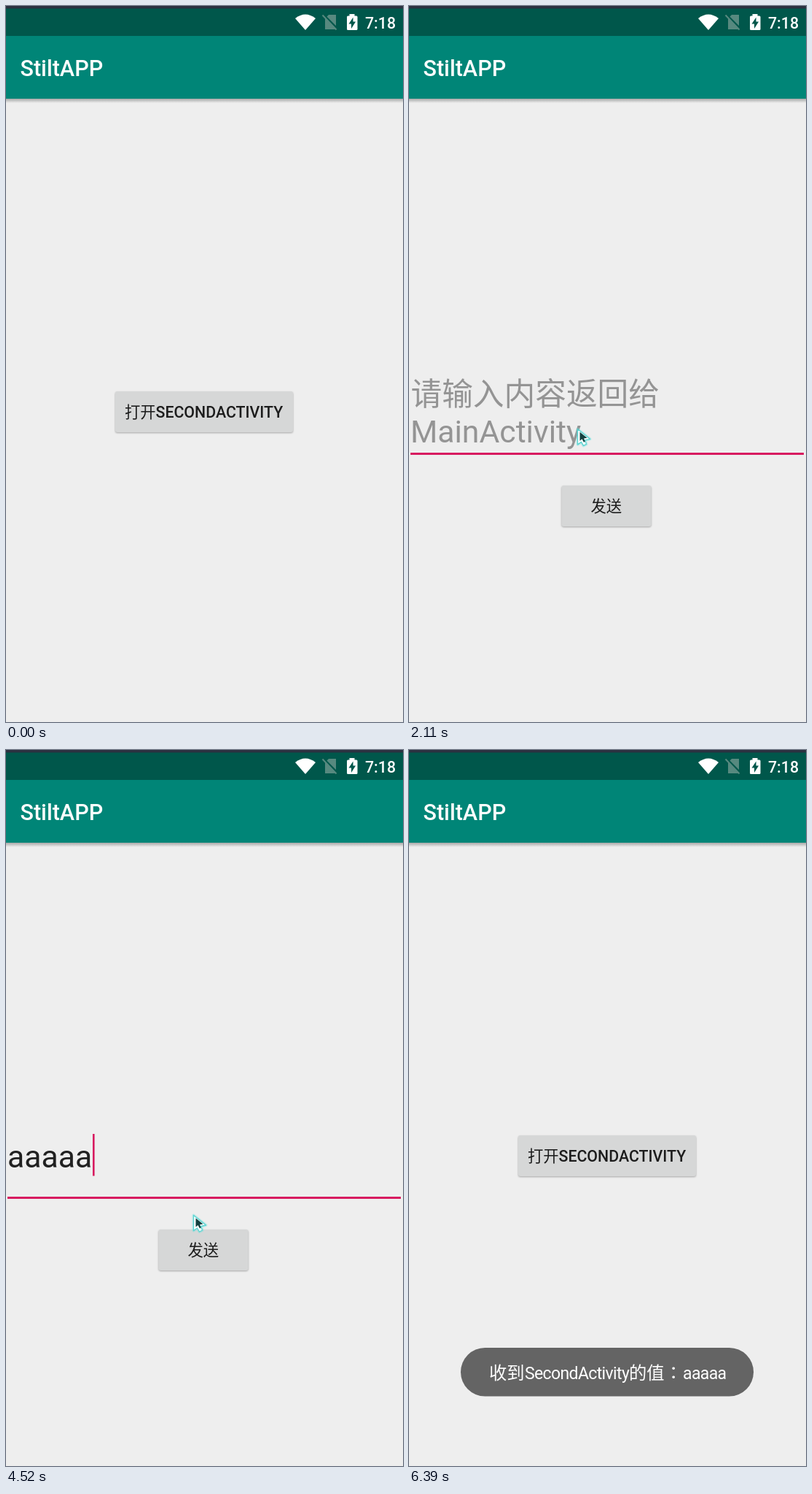
Animation, 545 px wide and 981 px high, one loop 6.77 s. Source, as an HTML page:

```html
<!DOCTYPE html>
<html lang="zh-CN">
<head>
<meta charset="utf-8">
<title>Activity result demo</title>
<style>
html, body { margin: 0; width: 100%; height: 100%; overflow: hidden; background: #eee; }
svg { display: block; width: 545px; height: 981px; }
text { font-family: Roboto, "Noto Sans CJK SC", "Noto Sans CJK", sans-serif; white-space: pre; }
.cap { font-size: 21.33px; fill: #1c1c1c; }
.med { font-weight: 500; }
.title { font-size: 30.5px; font-weight: 500; fill: #fff; }
.big { font-size: 42.7px; fill: #212121; }
.hint { fill: #949494; }
.toast { font-size: 24.3px; fill: #fff; }
.latin { font-size: 23px; letter-spacing: -.63px; }
.colon { font-family: "Noto Sans CJK TC", "Noto Sans CJK", sans-serif; }
.arrow { fill: #fff; stroke-linejoin: round; }
</style>
</head>
<body>
<svg viewBox="0 0 545 981">
  <defs>
    <linearGradient id="fall" x2="0" y2="1">
      <stop offset="0" stop-opacity=".3"/>
      <stop offset="1" stop-opacity="0"/>
    </linearGradient>
    <clipPath id="openClip"><rect x="150" y="528" width="244" height="56" rx="3"/></clipPath>
    <clipPath id="sendClip"><rect x="209.500" y="657" width="123" height="56" rx="3"/></clipPath>
    <path id="arrow" d="M1 1V22L6 18.500L9 23.500L13 21.500L11 16L18 14.500Z"/>
    <g id="bar">
      <rect y="127" width="545" height="854" fill="#eee"/>
      <rect y="127" width="545" height="6" fill="url(#fall)"/>
      <rect y="41" width="545" height="86" fill="#008577"/>
      <text class="title" x="19.500" y="96">StiltAPP</text>
    </g>
  </defs>

  <rect width="545" height="44" fill="#00574b"/>

  <g id="main">
    <use href="#bar"/>
    <rect id="openBtn" x="150" y="528" width="244" height="56" rx="3"/>
    <g clip-path="url(#openClip)"><circle id="openInk" cx="276" cy="547"/></g>
    <text class="cap" y="564"><tspan x="163">打开</tspan><tspan class="med" x="205.500">SECONDACTIVITY</tspan></text>
  </g>

  <g id="second">
    <use href="#bar"/>
    <g id="hint">
      <text class="big hint" x="2.500" y="547">请输入内容返回给</text>
      <text class="big hint" x="2" y="597.500">MainActivity</text>
    </g>
    <text id="typed" class="big" x="2" y="572"></text>
    <rect x="2" y="612" width="540" height="3" fill="#d81b60"/>
    <rect id="caret" y="526" width="2.600" height="57.500" fill="#d81b60"/>
    <rect id="sendBtn" x="209.500" y="657" width="123" height="56" rx="3"/>
    <g clip-path="url(#sendClip)"><circle id="sendInk" cx="258" cy="698"/></g>
    <text class="cap med" x="249.500" y="693">发送</text>
  </g>

  <rect width="545" height="3.500" fill="#2b3140"/>
  <path d="M397 17Q411 6 425 17L411 33Z" fill="#fff"/>
  <path d="M438 17L443 12H453V32H438Z" fill="#57897f"/>
  <path d="M436 12L455 31" stroke="#00574b" stroke-width="2.500"/>
  <path d="M434.500 12.500L453.500 32.500" stroke="#57897f" stroke-width="2"/>
  <rect x="471.500" y="11" width="7" height="4" fill="#fff"/>
  <rect x="468" y="13.500" width="14.500" height="19.500" rx="1.500" fill="#fff"/>
  <path d="M476.500 15.500L470.500 24.500H474V31L480 21.500H476.500Z" fill="#00574b"/>
  <text class="cap med" x="493" y="31" style="fill:#fff">7:18</text>

  <g id="toast">
    <rect x="71" y="819" width="402" height="66.500" rx="33.250" fill="#646464"/>
    <text class="toast" y="862"><tspan x="110">收到</tspan><tspan class="latin" x="159">SecondActivity</tspan><tspan x="302">的值</tspan></text>
    <text class="toast colon" lang="zh-TW" x="351" y="862">：</text>
    <text class="toast latin" x="376" y="862">aaaaa</text>
  </g>

  <g id="mouse">
    <use href="#arrow" class="arrow" stroke="#5fe0dc" stroke-opacity=".35" stroke-width="4"/>
    <use href="#arrow" class="arrow" stroke="#57d3d0" stroke-width="1.300"/>
    <path d="M4 5V17L7 14.500L9.500 19L11.300 18L9.500 13.700L14 13Z" fill="#12403f"/>
  </g>
</svg>
<script>
const LOOP = 6770, STEP = 78, LETTER = 23.3;
const OPEN = 1570, TYPE = 4220;
const el = Object.fromEntries([...document.querySelectorAll('[id]')].map(e => [e.id, e]));

const home = [430, 968];
// pointer moves: from, to (ms), end point
const moves = [
  [160, 780, 275, 544],
  [1100, 1560, 232, 601],
  [1600, 2180, 231, 579],
  [2670, 2960, 232, 587],
  [TYPE, 4524, 257, 637],
  [4524, 4914, 257, 697],
  [5616, 6080, 520, 850],
  [6080, 6310, 535, 975]
];

const ramp = (t, a, b) => Math.min(1, Math.max(0, (t - a) / (b - a)));
const easeOut = k => k * (2 - k);
const show = (e, on) => e.style.display = on ? '' : 'none';

function tip(t) {
  return moves.reduce(([px, py], [from, to, x, y]) => {
    const k = easeOut(ramp(t, from, to));
    return [px + (x - px) * k, py + (y - py) * k];
  }, home);
}

// Button lifts while held; ink spreads from the pointer, then fades
function press(btn, ink, t, start, end, radius) {
  const fade = 1 - ramp(t, end, end + 160);
  const lift = ramp(t, start - STEP, start) * fade;
  btn.style.filter = `drop-shadow(0 ${1.3 + lift}px ${.8 + lift * .7}px rgba(0,0,0,.3))`;
  btn.setAttribute('fill', lift ? '#d4d4d4' : '#d6d7d7');
  ink.setAttribute('r', radius * ramp(t, start, end));
  ink.setAttribute('opacity', .1 * fade);
}

function draw(t) {
  const q = Math.floor((t + 12) / STEP) * STEP;

  const closing = ramp(q, 4980, 5200);
  const open = t >= OPEN && closing < 1;
  const drop = 45 * closing ** 2 + .5 * (t < OPEN + STEP);
  show(el.second, open);
  show(el.main, !open || closing > 0);
  el.second.setAttribute('transform', `translate(0 ${drop})`);
  el.second.setAttribute('opacity', 1 - closing);

  const count = Math.min(5, Math.max(0, Math.floor((t - TYPE) / 75) + 1));
  el.typed.textContent = 'a'.repeat(count);
  show(el.hint, !count);
  show(el.caret, count || (t - OPEN + 20) % 950 < 470);
  el.caret.setAttribute('x', 2.5 + LETTER * count);

  press(el.openBtn, el.openInk, q, 780, 1260, 170);
  press(el.sendBtn, el.sendInk, q, 5020, 5300, 90);

  el.toast.setAttribute('opacity', easeOut(ramp(q, 5250, 5530)));

  const [x, y] = tip(q);
  show(el.mouse, t >= 170 && t < 6390 && !(t >= 6080 && t < 6310));
  el.mouse.setAttribute('transform', `translate(${x - .5} ${y - .5})`);
}

const begin = performance.now();
function tick() {
  draw((performance.now() - begin) % LOOP);
  requestAnimationFrame(tick);
}
tick();
</script>
</body>
</html>
```
